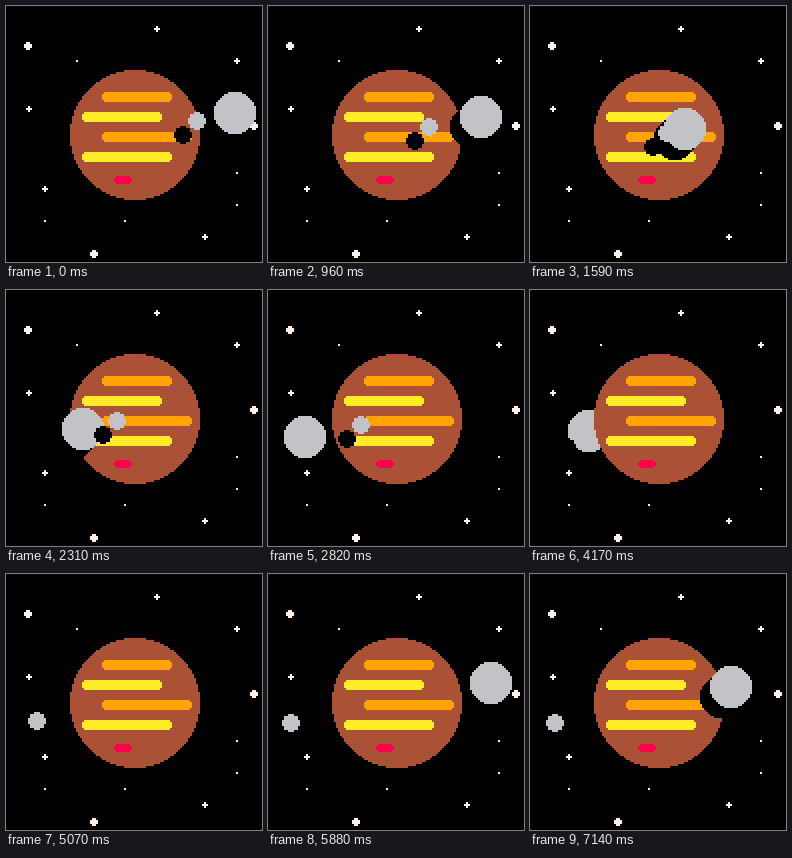
Recreate the animation shown at these times as an HTML page with a canvas. Size 256 px wide and 256 px high, loop 7170 ms.

```html
<!DOCTYPE html>
<html lang="en">
<head>
<meta charset="utf-8">
<title>Planet with two moons</title>
<style>
  html, body { margin: 0; height: 100%; overflow: hidden; background: #000; }
  canvas { display: block; width: 100vw; height: 100vh; image-rendering: pixelated; }
</style>
</head>
<body>
<canvas id="sky" width="128" height="128"></canvas>
<script>
const ctx = document.getElementById('sky').getContext('2d');
const LOOP = 7170, STEP = 30;
const BLACK = '#000', WHITE = '#fff1e8', GREY = '#c2c3c7', BROWN = '#ab5236',
      ORANGE = '#ffa300', YELLOW = '#ffec27', RED = '#ff004d';

// Orbit shared by both moons, a tilted line seen edge-on
const CENTER = 64, REACH = 53.35, TILT = 0.2;
const moons = [
  { r: 10, phase: -0.3495, speed: 1.045, shade: 5 },
  { r: 4, phase: 0.932, speed: 0.347, shade: 7 }
];

const bigStars = [[9, 18], [122, 58], [42, 122]];
const crosses = [[75, 11], [115, 27], [11, 51], [19, 91], [99, 115]];
const dots = [[35, 27], [19, 107], [59, 107], [115, 83], [115, 99]];

// x, y, width, height, colour
const bands = [
  [48, 43, 35, 5, ORANGE],
  [38, 53, 40, 5, YELLOW],
  [48, 63, 45, 5, ORANGE],
  [38, 73, 45, 5, YELLOW],
  [54, 85, 9, 4, RED]
];

function rect(x, y, w, h, color) {
  ctx.fillStyle = color;
  ctx.fillRect(x, y, w, h);
}

// Rectangle without its four corner pixels
function pill(x, y, w, h, color) {
  rect(x + 1, y, w - 2, h, color);
  rect(x, y + 1, w, h - 2, color);
}

// Midpoint rule for a pixel disc
function inDisc(a, b, r) {
  const hi = Math.max(a, b), lo = Math.min(a, b);
  return lo * lo + hi * hi - hi < r * r;
}

function disc(cx, cy, r, color) {
  for (let dy = -r; dy <= r; dy++) {
    let half = r;
    while (half > 0 && !inDisc(half, Math.abs(dy), r)) half--;
    rect(cx - half, cy + dy, half * 2 + 1, 1, color);
  }
}

function drawStars() {
  for (const [x, y] of bigStars) pill(x, y, 4, 4, WHITE);
  for (const [x, y] of crosses) pill(x - 1, y - 1, 3, 3, WHITE);
  for (const [x, y] of dots) rect(x, y, 1, 1, WHITE);
}

function drawPlanet() {
  disc(CENTER, CENTER, 32, BROWN);
  for (const band of bands) pill(...band);
}

function drawMoons(seconds, front) {
  for (const { r, phase, speed, shade } of moons) {
    const angle = phase + speed * seconds;
    if (Math.sin(angle) > 0 !== front) continue;
    const offset = REACH * Math.cos(angle);
    const x = Math.floor(CENTER + offset);
    const y = Math.floor(CENTER - TILT * offset);
    if (front) disc(x - shade, y + shade, r, BLACK);
    disc(x, y, r, GREY);
  }
}

function draw(ms) {
  const seconds = Math.floor((ms % LOOP) / STEP) * STEP / 1000;
  rect(0, 0, 128, 128, BLACK);
  drawStars();
  drawMoons(seconds, false);
  drawPlanet();
  drawMoons(seconds, true);
}

let start;
function tick(now) {
  start ??= now;
  draw(Math.max(0, now - start));
  requestAnimationFrame(tick);
}
draw(0);
requestAnimationFrame(tick);
</script>
</body>
</html>
```
